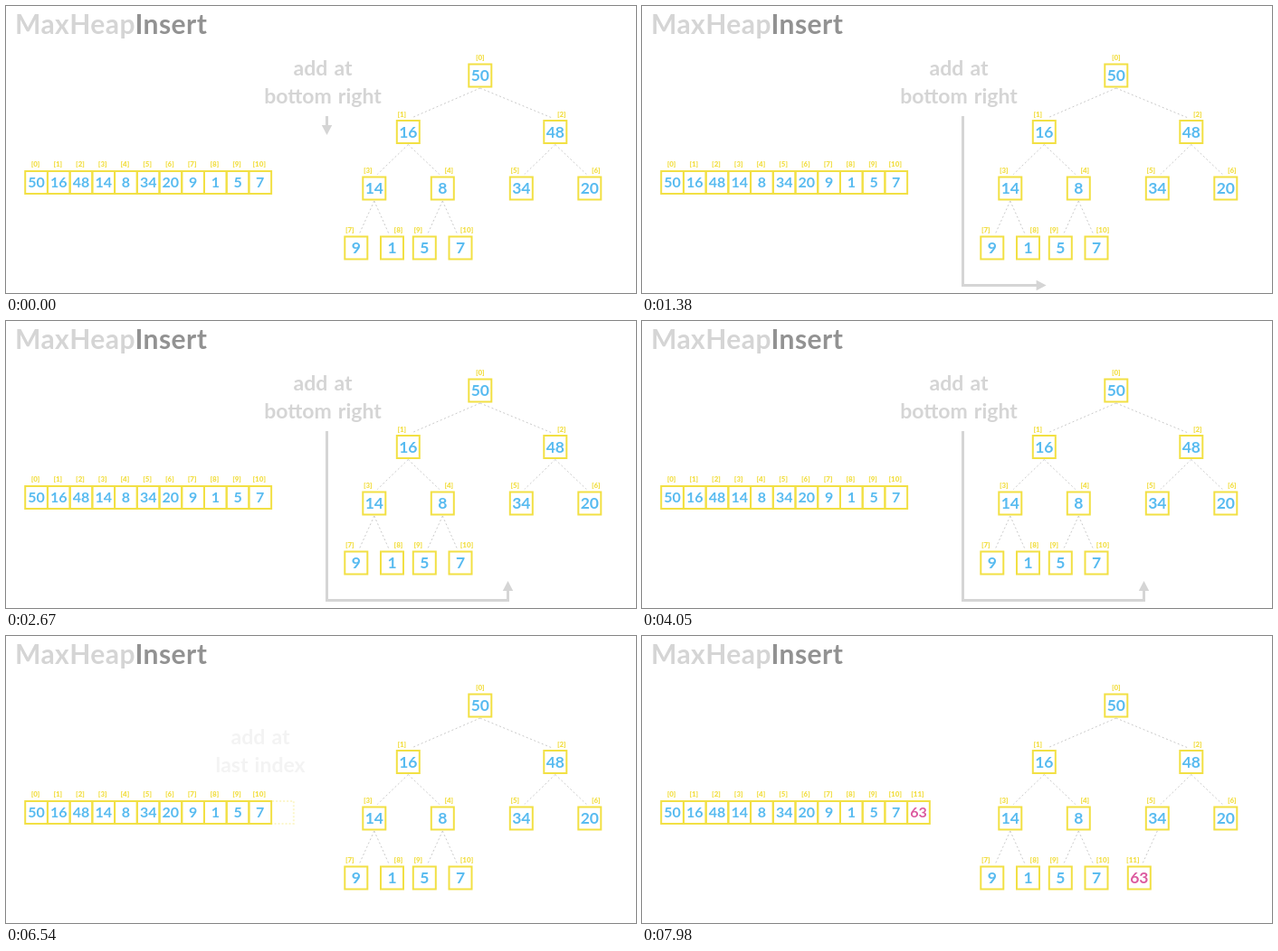
An HTML page for the animation above (8000 ms loop, 696 by 318 pixels).

```html
<!DOCTYPE html>
<html lang="en">
<head>
<meta charset="utf-8">
<title>MaxHeapInsert</title>
<style>
  html, body { margin: 0; width: 100%; height: 100%; overflow: hidden; background: #fff; }
  svg { display: block; width: 696px; height: 318px; }
  text { font-family: Lato, "Open Sans", sans-serif; font-weight: 700; }
  .title { fill: #d5d5d5; font-size: 30px; letter-spacing: 0.45px; }
  .num, .index, .note { text-anchor: middle; }
  .num { fill: #58bbf0; }
  .new { fill: #dc5a9f; }
  .index { fill: #f2df48; font-size: 8px; font-weight: 900; }
  .note { fill: #d5d5d5; font-size: 23px; word-spacing: 1.5px; }
  .box { fill: none; stroke: #f2e044; stroke-width: 2; }
  .edge { stroke: #cacaca; stroke-width: 1; stroke-dasharray: 2 2.6; }
</style>
</head>
<body>
<svg id="stage" viewBox="0 0 696 318">
  <text class="title" x="10" y="31">MaxHeap<tspan fill="#929292">Insert</tspan></text>
</svg>
<script>
const LOOP = 8000;
const CELL = { x: 21.2, y: 183, w: 24.72, h: 25, font: 16 };
const NODE = { size: 25, font: 17.5 };
const ROOT = { x: 523.8, y: 77 };
// Row height and child offsets per tree level
const LEVELS = [
  { y: 139.5, left: -79.5, right: 83 },
  { y: 202, left: -37.5, right: 38 },
  { y: 268, left: -20, right: 19.7 }
];
const values = [50, 16, 48, 14, 8, 34, 20, 9, 1, 5, 7, 63];
const last = values.length - 1;

const parentOf = i => (i - 1) >> 1;
// -1 for a left child, 1 for a right child, 0 for the root
const sideOf = i => i === 0 ? 0 : i % 2 ? -1 : 1;

function nodeAt(i) {
  if (i === 0) return ROOT;
  const level = LEVELS[Math.floor(Math.log2(i + 1)) - 1];
  const shift = sideOf(i) < 0 ? level.left : level.right;
  return { x: nodeAt(parentOf(i)).x + shift, y: level.y };
}

const cellX = i => CELL.x + CELL.w * i;
const cellMid = i => ({ x: cellX(i) + CELL.w / 2, y: CELL.y + CELL.h / 2 });

const stage = document.getElementById('stage');

function add(parent, tag, attrs = {}, content) {
  const el = document.createElementNS('http://www.w3.org/2000/svg', tag);
  for (const key in attrs) el.setAttribute(key, attrs[key]);
  if (content !== undefined) el.textContent = content;
  return parent.appendChild(el);
}

const group = () => add(stage, 'g');

function addNumber(parent, i, { x, y }, size) {
  return add(parent, 'text', {
    class: i === last ? 'num new' : 'num', x, y: y + size * 0.36, 'font-size': size
  }, values[i]);
}

function addIndex(parent, i, x, y) {
  add(parent, 'text', { class: 'index', x, y: y + 2.8 }, `[${i}]`);
}

function addNote(parent, x, y, lines) {
  lines.forEach((line, i) => add(parent, 'text', { class: 'note', x, y: y + i * 30.5 }, line));
}

function addNode(parent, i) {
  const { x, y } = nodeAt(i);
  const half = NODE.size / 2;
  const side = sideOf(i);
  if (side) {
    const from = nodeAt(parentOf(i));
    add(parent, 'line', { class: 'edge', x1: from.x, y1: from.y + 14, x2: x - side * 3.5, y2: y - 15.5 });
  }
  add(parent, 'rect', { class: 'box', x: x - half, y: y - half, width: NODE.size, height: NODE.size });
  addNumber(parent, i, { x, y }, NODE.font);
  addIndex(parent, i, x + side * 7, y - 19.7);
}

function addCell(parent, i) {
  add(parent, 'rect', { class: 'box', x: cellX(i), y: CELL.y, width: CELL.w, height: CELL.h });
  addIndex(parent, i, cellMid(i).x - 1, 175);
}

const base = group();
for (let i = 0; i < last; i++) {
  addNode(base, i);
  addCell(base, i);
  addNumber(base, i, cellMid(i), CELL.font);
}

const treeHint = group();
addNote(treeHint, 350, 77, ['add at', 'bottom right']);
const route = [[354.5, 122], [354.5, 309.5], [554.5, 309.5], [554.5, 288]];
const shaft = add(treeHint, 'path', { fill: 'none', stroke: '#d5d5d5', 'stroke-width': 3 });
const head = add(treeHint, 'path', { d: 'M0 0L-11 -5.7V5.7Z', fill: '#d5d5d5' });

const arrayHint = group();
addNote(arrayHint, 281, 120, ['add at', 'last index']);
add(arrayHint, 'path', {
  class: 'box', 'stroke-dasharray': '2 2',
  d: `M${cellX(last) + 1} ${CELL.y}h${CELL.w - 1}v${CELL.h}h${1 - CELL.w}`
});

const newNode = group();
addNode(newNode, last);
const newCell = group();
addCell(newCell, last);
const mover = addNumber(stage, last, nodeAt(last), NODE.font);

const mix = (a, b, p) => a + (b - a) * p;
const ramp = (t, from, to) => Math.min(1, Math.max(0, (t - from) / (to - from)));
const ease = (t, from, to) => (1 - Math.cos(Math.PI * ramp(t, from, to))) / 2;
const fade = (el, amount) => el.setAttribute('opacity', amount);

// Points of the route up to the given length
function cutRoute(length) {
  const points = [route[0]];
  for (let i = 1; i < route.length && length > 0; i++) {
    const [x1, y1] = route[i - 1];
    const [x2, y2] = route[i];
    const side = Math.hypot(x2 - x1, y2 - y1);
    const p = Math.min(1, length / side);
    points.push([mix(x1, x2, p), mix(y1, y2, p)]);
    length -= side;
  }
  return points;
}

function drawArrow(length) {
  const line = cutRoute(length - 10);
  const [bx, by] = line[line.length - 1];
  const [tx, ty] = cutRoute(length).pop();
  const angle = Math.atan2(ty - by, tx - bx) * 180 / Math.PI;
  shaft.setAttribute('d', 'M' + line.join('L'));
  head.setAttribute('transform', `translate(${tx} ${ty}) rotate(${angle})`);
}

function moveNumber(p) {
  const from = nodeAt(last);
  const to = cellMid(last);
  const size = mix(NODE.font, CELL.font, p);
  mover.setAttribute('x', mix(from.x, to.x, p));
  mover.setAttribute('y', mix(from.y, to.y, p) + size * 0.36);
  mover.setAttribute('font-size', size);
  mover.setAttribute('visibility', p > 0 ? 'visible' : 'hidden');
}

function render(t) {
  drawArrow(mix(21, 409, ease(t, 560, 1910)));
  fade(treeHint, 1 - ease(t, 4630, 4960));
  fade(arrayHint, ease(t, 5190, 5410) * (1 - ease(t, 6340, 6650)));
  fade(newNode, ease(t, 6610, 6930));
  fade(newCell, ease(t, 7470, 7860));
  moveNumber(ease(t, 7060, 7870));
}

const start = performance.now();
function tick() {
  render((performance.now() - start) % LOOP);
  requestAnimationFrame(tick);
}
render(0);
requestAnimationFrame(tick);
</script>
</body>
</html>
```
